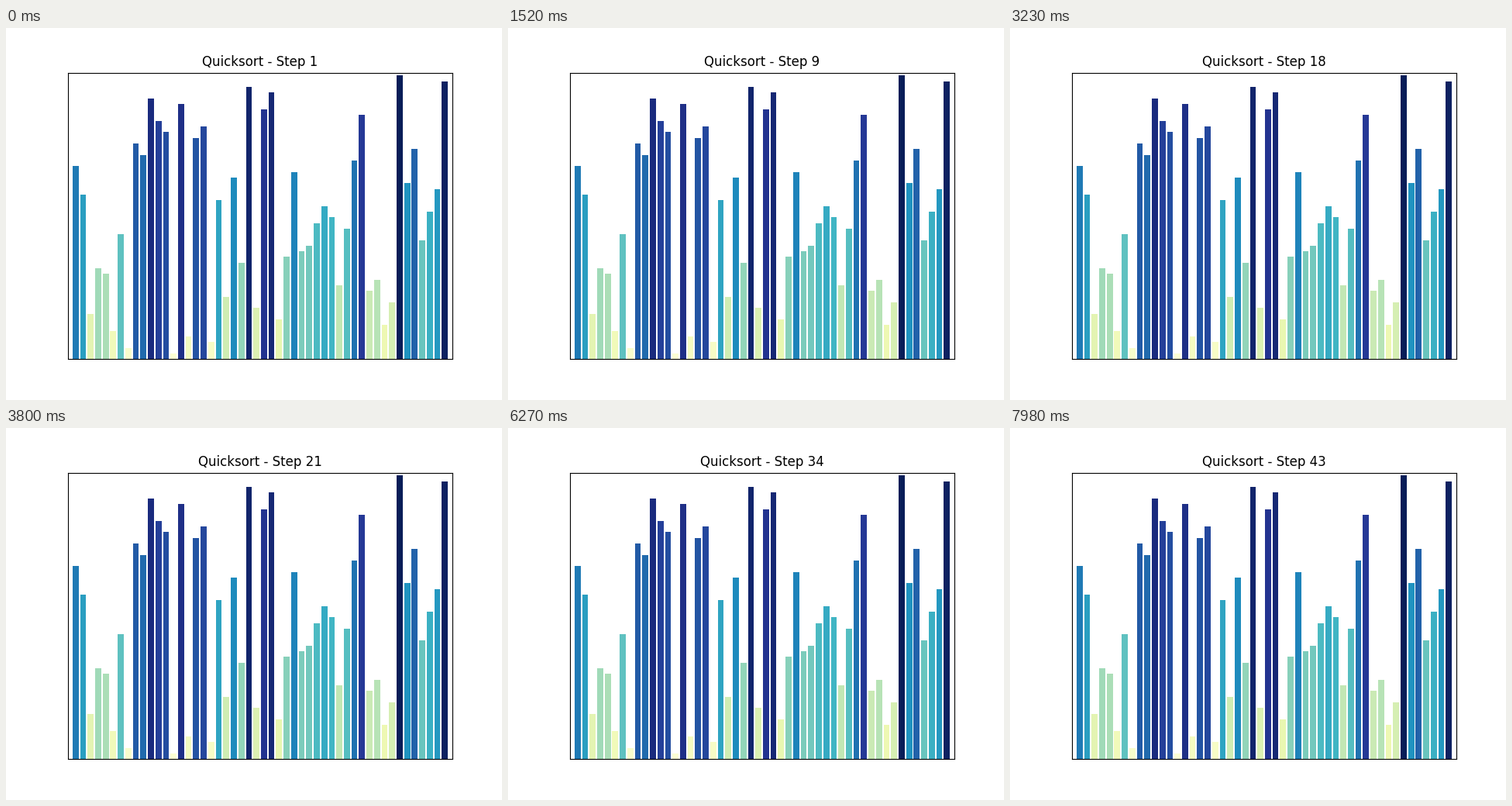
These frames come from a looping animation (640x480 px, 8000 ms). A matplotlib script:

```python
import numpy as np
import matplotlib.pyplot as plt
from matplotlib.animation import FuncAnimation
from matplotlib.collections import PolyCollection

LOOP_MS = 8000
TICK_MS = 10
STEP_MS = 190
BAR_WIDTH = 0.8

values = np.array([
    34, 29, 8, 16, 15, 5, 22, 2, 38, 36, 46, 42, 40, 1, 45, 4, 39,
    41, 3, 28, 11, 32, 17, 48, 9, 44, 47, 7, 18, 33, 19, 20, 24, 27,
    25, 13, 23, 35, 43, 12, 14, 6, 10, 50, 31, 37, 21, 26, 30, 49,
])


def bar_outline(x, height):
    left, right = x - BAR_WIDTH / 2, x + BAR_WIDTH / 2
    return [(left, 0), (left, height), (right, height), (right, 0)]


fig, ax = plt.subplots(figsize=(6.4, 4.8), dpi=100)
ax.set_xlim(-1, len(values))
ax.set_ylim(0, values.max() * 1.01)
ax.set_xticks([])
ax.set_yticks([])

# One collection for all bars keeps each redraw fast.
ax.add_collection(PolyCollection(
    [bar_outline(x, v) for x, v in enumerate(values)],
    facecolors=plt.cm.YlGnBu(values / values.max()),
    edgecolors="none",
), autolim=False)
title = ax.set_title("Quicksort - Step 1")


def update(tick):
    step = tick * TICK_MS // STEP_MS + 1
    title.set_text(f"Quicksort - Step {step}")
    return (title,)


anim = FuncAnimation(fig, update, frames=LOOP_MS // TICK_MS,
                     interval=TICK_MS, repeat=True, repeat_delay=0)
plt.show()
```
